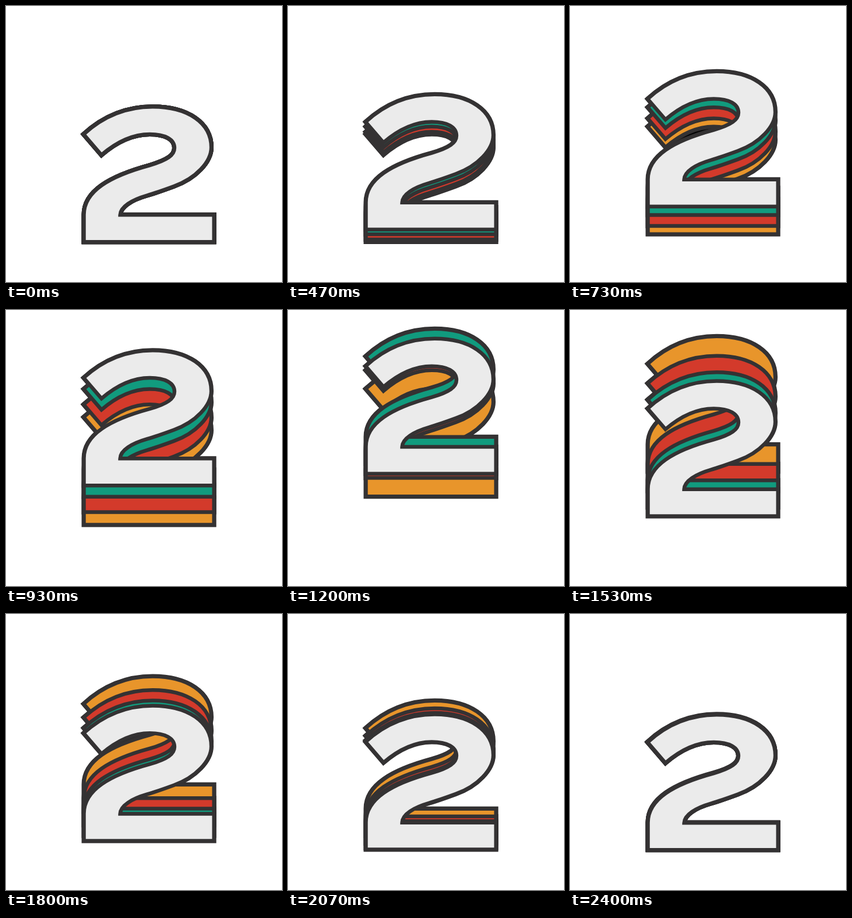
Write an HTML page with a canvas that moves like this. It is 480 px wide and 480 px high and loops after 2470 ms.

```html
<!DOCTYPE html>
<html>
<head>
<meta charset="utf-8">
<style>
html, body { margin: 0; width: 100%; height: 100%; overflow: hidden; background: #fff; }
canvas { display: block; }
</style>
</head>
<body>
<canvas id="stage" width="480" height="480"></canvas>
<script>
const ctx = document.getElementById('stage').getContext('2d');
const LOOP = 2470, STEP = 1000 / 15;
const TURN = 1106, RISE = 1024, HEIGHT = 152, CEILING = 142.5;

// Back to front; each layer follows the same hop after its own delay
const layers = [
  { color: '#e8952b', delay: 348 },
  { color: '#d33a2b', delay: 215 },
  { color: '#119b7e', delay: 83 },
  { color: '#ebebeb', delay: 0 }
];

const two = new Path2D(`M135 223
  C172 189 212 175.2 255 175.2 C316 175.2 357 203 357 246
  C357 271 330 300 292 313.5 C277 319 262 324.5 245 329.5
  C219 337 199 349 198.5 363.3
  H361.7 V410.2 H135.5 V363
  C135.5 322 180 296 250 277 C281 268 293 259 293 247
  C293 232 277 223 250 223 C224 223 195 234 166 259 Z`);
const gapShade = new Path2D('M167 255 L215 222 L290 225 L290 262 L167 272 Z');

// Quadratic ease-in on the way up, ease-out on the way down
function lift(t) {
  const k = Math.max(0, 1 - Math.abs(t - TURN) / RISE);
  return Math.min(CEILING, HEIGHT * k * k);
}

function drawAt(y, paint) {
  ctx.save();
  ctx.translate(0, -y);
  paint();
  ctx.restore();
}

function render(time) {
  const t = Math.floor((time % LOOP + 4) / STEP) * STEP;
  const lifts = layers.map(layer => lift(t - layer.delay));
  const back = lifts[0], front = lifts[3], spread = Math.abs(front - back);

  ctx.fillStyle = '#fff';
  ctx.fillRect(0, 0, 480, 480);

  // The counter turns black once the layers close it off
  if (spread > 38 && spread < 52) {
    ctx.fillStyle = '#000';
    drawAt(Math.min(back, front), () => ctx.fill(gapShade));
  }

  // Slightly heavier rim around the whole stack
  ctx.strokeStyle = '#2b292a';
  ctx.lineWidth = 8;
  lifts.forEach(y => drawAt(y, () => ctx.stroke(two)));

  ctx.strokeStyle = '#343233';
  ctx.lineWidth = 6.5;
  layers.forEach((layer, i) => drawAt(lifts[i], () => {
    ctx.fillStyle = layer.color;
    ctx.fill(two);
    ctx.stroke(two);
  }));
}

const begin = performance.now();
function tick() {
  render(performance.now() - begin);
  requestAnimationFrame(tick);
}
tick();
</script>
</body>
</html>
```
